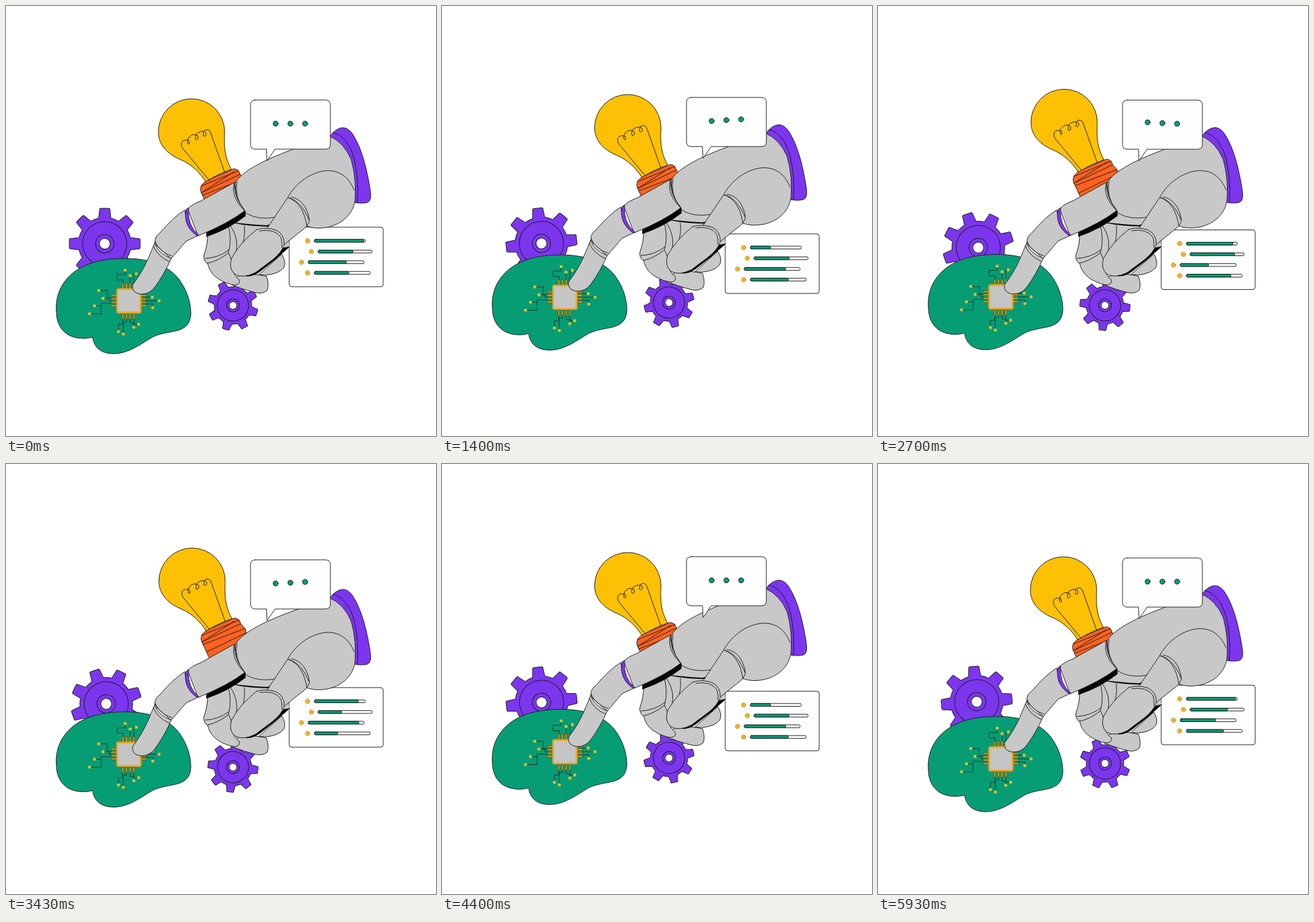
An HTML page for the animation above (6010 ms loop, 700x700 px).

```html
<!DOCTYPE html>
<html lang="en">
<head>
<meta charset="utf-8">
<title>Robot hand</title>
<style>
html, body { margin: 0; width: 100%; height: 100%; overflow: hidden; background: #fff; }
svg { display: block; width: 100vw; height: 100vh; }
.ink { stroke: #1c1c1c; stroke-width: 1; stroke-linejoin: round; stroke-linecap: round; }
.line { fill: none; }
.grey { fill: #c8c8c8; }
.green { fill: #069d75; }
.yellow { fill: #fec005; }
.orange { fill: #ff6220; }
.purple { fill: #7c36ee; }
.white { fill: #fefefe; }
.black { fill: #050505; }
.pin { fill: #e3a81f; stroke: #4d3b0c; stroke-width: .7; }
.trace { fill: none; stroke: #123f32; stroke-width: 1.1; marker-end: url(#pad); }
</style>
</head>
<body>
<svg viewBox="0 0 700 700" xmlns="http://www.w3.org/2000/svg">
  <defs>
    <marker id="pad" markerUnits="userSpaceOnUse" markerWidth="6" markerHeight="6" refX="3" refY="3">
      <circle cx="3" cy="3" r="2.5" fill="#e0c02b"/>
    </marker>
  </defs>

  <g id="bigGear"></g>

  <g id="brain">
    <path class="ink green" d="M82 497C80 472 90 449 111 433C135 415 165 411 195 411C237 411 265 424 281 444C294 461 301 482 301 501C300 518 292 524 280 528C264 532 247 533 235 541C213 555 196 566 175 566C155 566 143 556 141 539C127 543 111 541 101 535C88 527 82 514 82 497Z"/>
    <g id="circuit"></g>
    <rect x="181" y="461" width="38" height="38" rx="2" fill="#c5c5c5" stroke="#f5a623" stroke-width="2.800"/>
  </g>

  <g id="bulb">
    <path class="ink orange" d="M325 285L318 292Q315 299 318 304L330 330L345 336L393 305L389 283L381 274Q379 265 371 265Z"/>
    <path class="ink line" d="M318 293L379 268M318 304L381 274M320 308L388 282M326 320L390 289M318 304L371 270"/>
    <path class="ink yellow" d="M325 286C316 272 303 258 284 250C260 240 248 224 248 205A54 54 0 0 1 356 205C355 226 355 245 367 266Q344 274 325 286Z"/>
    <path class="ink line" d="M331 284L287 231Q282 220 292 218Q301 218 298 225Q293 224 297 215Q304 206 312 211Q315 218 309 218Q306 209 315 205Q324 202 326 208Q325 214 321 211Q321 199 330 202Q333 204 334 209L356 271"/>
  </g>

  <g id="smallGear"></g>

  <g id="card">
    <rect class="ink white" x="461" y="360" width="153" height="97" rx="4"/>
    <g id="rows"></g>
  </g>

  <g id="hand">
    <path class="ink purple" d="M528 211Q537 199 548 198Q557 198 564 208C580 232 588 268 593 300Q596 317 588 320Q579 322 568 320Z"/>
    <path class="ink line" d="M532 206Q557 212 567 250Q575 285 572 320"/>

    <!-- curled fingers -->
    <path class="grey" d="M328 373L392 328L450 340L462 393L400 440L366 430Z"/>
    <path class="ink grey" d="M412 437L449 404Q457 417 452 426Q444 436 424 438Z"/>
    <path class="ink grey" d="M368 446Q384 431 424 440Q429 455 425 463Q417 470 404 466Q382 460 368 454Z"/>
    <path class="ink line" d="M388 358Q390 380 383 392M364 356Q384 383 370 414"/>
    <path class="ink grey" d="M328 416L362 402Q369 412 366 425Q372 440 380 446Q381 455 370 454C349 449 330 438 328 416Z"/>
    <path class="ink grey" d="M328 371L360 351Q369 378 362 402Q344 416 327 419Q321 413 322 406Q329 387 328 371Z"/>
    <path class="ink line" d="M324 411Q346 410 363 397"/>

    <!-- palm -->
    <path class="ink grey" d="M373 288C382 273 403 261 426 250C459 235 494 224 527 212Q550 222 562 250Q571 283 568 317C565 337 550 354 524 360Q504 364 489 358L464 340L437 344C412 348 394 342 384 331Q373 312 373 288Z"/>
    <path class="black" d="M361 351Q388 355 424 357L437 354L434 359Q390 359 361 351Z"/>
    <path class="ink line" d="M459 311C473 286 499 269 524 268Q554 268 567 300"/>

    <!-- thumb -->
    <path class="black" d="M380 437Q396 445 413 433L437 414L463 391L445 395L404 431Z"/>
    <path class="ink grey" d="M459 312Q481 317 494 350Q490 360 482 365L452 389L424 364Z"/>
    <path class="ink line" d="M459 312Q484 320 490 359M464 311Q488 315 494 348"/>
    <path class="ink grey" d="M408 364Q424 359 440 365Q454 372 453 389Q448 402 434 413L406 434Q386 444 373 437Q362 428 367 411Q381 385 408 364Z"/>
    <path class="ink line" d="M413 366Q437 362 447 376Q450 383 449 393"/>

    <!-- index finger -->
    <path class="black" d="M326 376Q362 364 390 342L390 333L326 369Z"/>
    <path class="ink grey" d="M296 330Q302 323 318 317L372 287Q371 313 389 333Q362 354 313 374Z"/>
    <path class="ink line" d="M371 289Q366 312 388 333M376 286Q371 310 387 331"/>
    <path class="ink grey" d="M243 388Q240 377 250 370Q273 343 291 332Q293 358 312 374L293 383Q283 395 269 411Z"/>
    <path class="ink purple" d="M293 332Q288 358 311 374L314 373Q295 358 297 329Z"/>
    <path class="ink grey" d="M242 386Q248 403 269 411Q257 438 242 458Q233 470 218 469Q204 466 206 454Q222 433 231 412Q237 398 242 386Z"/>
    <path class="ink line" d="M240 391Q247 408 266 416M243 384Q250 401 270 407"/>
  </g>

  <g id="bubble">
    <path class="ink white" d="M406 153H520Q528 153 528 161V225Q528 233 520 233H438L425 252L424 233H406Q398 233 398 225V161Q398 153 406 153Z"/>
    <g id="dots"></g>
  </g>
</svg>

<script>
const LOOP = 6.01;
const TAU = Math.PI * 2;
const $ = id => document.getElementById(id);
const wave = (t, peak = 0, period = LOOP) => Math.cos(TAU * (t - peak) / period);

function add(parent, tag, attrs) {
  const node = document.createElementNS("http://www.w3.org/2000/svg", tag);
  for (const key in attrs) node.setAttribute(key, attrs[key]);
  return parent.appendChild(node);
}

// Eases through [time, value] poses, starting and ending the loop at rest.
function poses(...keys) {
  keys = [[0, 0], ...keys, [LOOP, 0]];
  return t => {
    const next = keys.findIndex(key => key[0] > t);
    const [t0, v0] = keys[next - 1], [t1, v1] = keys[next];
    return v0 + (v1 - v0) * (1 - Math.cos(Math.PI * (t - t0) / (t1 - t0))) / 2;
  };
}

function buildGear(group, body, outer, half, rim, hub, hole) {
  const base = Math.asin((half + 1) / body), tip = Math.asin(half / outer), soft = tip * .28;
  const at = (r, a) => (r * Math.sin(a)).toFixed(2) + " " + (-r * Math.cos(a)).toFixed(2);
  let d = "";
  for (let k = 0; k < 8; k++) {
    const a = k * TAU / 8;
    d += `${k ? `A${body} ${body} 0 0 1 ` : "M"}${at(body, a - base)}`
       + `L${at(outer - 3, a - tip)}Q${at(outer, a - tip)} ${at(outer, a - tip + soft)}`
       + `L${at(outer, a + tip - soft)}Q${at(outer, a + tip)} ${at(outer - 3, a + tip)}`
       + `L${at(body, a + base)}`;
  }
  add(group, "path", { class: "ink purple", d: d + `A${body} ${body} 0 0 1 ${at(body, -base)}Z` });
  add(group, "circle", { class: "ink line", r: rim });
  add(group, "circle", { class: "ink line", r: hub });
  add(group, "circle", { class: "ink white", r: hole });
}

function buildCircuit() {
  const g = $("circuit");
  const traces = "M191,452V446H181V437H194V430 M202,452V439 M208,452V436H212 M172,475H165V463H151 " +
    "M172,480H168V476H158 M172,484H155V488H144 M155,488V501H136 M228,474H238 M228,480H249 " +
    "M228,485H239V491 M190,509V518H183V530 M196,509V514H191V534 M202,509V516H208V523 M208,509V518H216";
  for (const d of traces.split(" ")) add(g, "path", { class: "trace", d });
  for (let k = 0; k < 4; k++) {
    const x = 189 + k * 6, y = 470 + k * 5.5;
    for (const py of [451, 501]) add(g, "rect", { class: "pin", x, y: py, width: 2.6, height: 9 });
    for (const px of [171, 220]) add(g, "rect", { class: "pin", x: px, y, width: 9, height: 2.6 });
  }
}

function buildRow(x, width, peak, i) {
  const y = 382.3 + i * 17.4;
  const bar = { x, y: y - 2.3, width, height: 4.6, rx: 2 };
  add($("rows"), "rect", { class: "ink white", ...bar });
  const fill = add($("rows"), "rect", { class: "ink green", ...bar });
  add($("rows"), "circle", { cx: x - 11, cy: y, r: 3.4, fill: "none",
    stroke: "#a8790a", "stroke-width": 1.4, "stroke-dasharray": "1.7 1" });
  add($("rows"), "circle", { cx: x - 11, cy: y, r: 3, fill: "#eeb31a" });
  return t => fill.setAttribute("width", width * (.68 + .29 * wave(t, peak, LOOP / 2)));
}

function move(id, x, y, angle = 0) {
  $(id).setAttribute("transform", `translate(${x.toFixed(2)} ${y.toFixed(2)}) rotate(${angle.toFixed(2)})`);
}

buildGear($("bigGear"), 43, 58, 9, 36, 15, 8.8);
buildGear($("smallGear"), 30.5, 41, 6.3, 25.5, 10.5, 6.3);
buildCircuit();
const rows = [[502, 83, 0], [508, 88, 2.2], [492, 91, .75], [502, 91, 2.15]]
  .map(([x, width, peak], i) => buildRow(x, width, peak, i));
const dots = [439, 463, 487].map(cx => add($("dots"), "circle", { class: "ink green", cx, r: 4.1 }));

const hand = poses([2, -6], [3.43, 6], [4.4, -9]);
const bubble = poses([1.7, -4.5], [3.43, 3], [4.6, -2.5]);
const card = poses([1.3, 11], [3.2, 3.3], [4.3, 10]);
const bulb = poses([.15, 0], [2.85, -15.7], [5.75, 0]);
const brain = poses([.3, 0], [1.7, -6.5], [3, -6.5], [4.5, -11.7], [5, -11.7], [5.85, 0]);
const bigGear = poses([.83, -5], [2.2, 7], [4.4, 1]);

function draw(t) {
  const turn = t / LOOP * 360;
  move("bigGear", 162 - 1.3 * wave(t), 387 + bigGear(t), turn);
  move("smallGear", 369.5, 487.5 + hand(t), 17 - turn + 8 * (1 - wave(t)));
  move("brain", 0, brain(t));
  move("bulb", -bulb(t) / 16, bulb(t));
  move("card", 0, card(t));
  move("hand", 0, hand(t));
  move("bubble", 0, bubble(t));
  rows.forEach(setFill => setFill(t));
  dots.forEach((dot, i) => {
    const u = (t + 1.5 - i * .12) % (LOOP / 3) / .9;
    dot.setAttribute("cy", 191.5 - (u < 1 ? 3.7 * Math.sin(Math.PI * u) : 0));
  });
}

const start = performance.now();
function frame() {
  draw((performance.now() - start) / 1000 % LOOP);
  requestAnimationFrame(frame);
}
frame();
</script>
</body>
</html>
```
